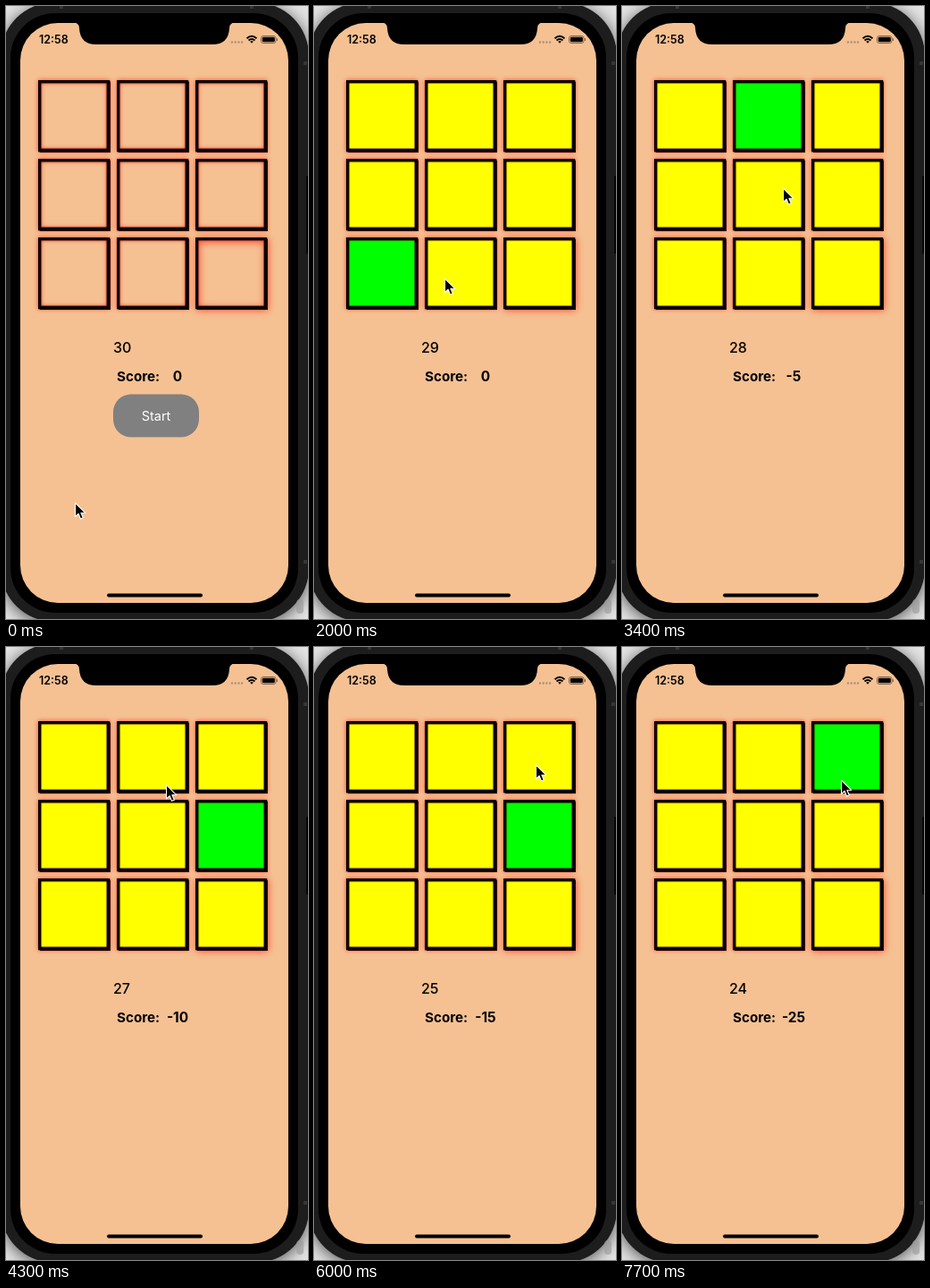
An HTML page that plays this animation: 338 px wide and 686 px high, repeating every 8000 ms.

```html
<!DOCTYPE html>
<html lang="en">
<head>
<meta charset="utf-8">
<title>Tap the square</title>
<style>
  html, body { margin: 0; width: 100%; height: 100%; overflow: hidden; background: #e4e4e4; }
  #stage { position: absolute; left: 0; top: 0; width: 338px; height: 686px; overflow: hidden; }
  svg { position: absolute; left: 0; top: 0; overflow: visible; }
  text { font-family: Inter, Roboto, sans-serif; }
  #body {
    position: absolute; left: -6px; top: -4px; width: 345px; height: 693px;
    border-radius: 60px; background: #1d1d1e; box-shadow: 0 3px 18px rgba(0, 0, 0, .65);
  }
  .cell {
    --edge: 0 0 1px .5px #300;
    --glow: rgba(255, 45, 25, .85);
    position: absolute; box-sizing: border-box; width: 80px; height: 80px;
    border: 3px solid #080000;
    box-shadow: var(--edge), inset var(--edge), 0 0 5px var(--glow), inset 0 0 5px var(--glow);
  }
  .cell:nth-child(9) {
    box-shadow: var(--edge), inset var(--edge), 1px 1px 8px var(--glow), inset 1px 2px 8px var(--glow);
  }
  .on .cell { background: #ff0; box-shadow: var(--edge), inset var(--edge), 0 0 5px var(--glow); }
  .on .cell:nth-child(9) { box-shadow: var(--edge), inset var(--edge), 1px 1px 8px var(--glow); }
  .on .cell.lit { background: #0f0; }
</style>
</head>
<body>
<div id="stage">
  <div id="body"></div>
  <svg width="338" height="686" viewBox="0 0 338 686">
    <!-- phone -->
    <rect x="5" y="8" width="322" height="671" rx="50" fill="#000"/>
    <path d="M62 0v3M275 0v3M333 64h4M333 622h4" stroke="#363636" stroke-width="4"/>
    <rect x="336" y="190" width="2" height="87" fill="#050505"/>
    <rect x="325" y="664" width="8" height="16" rx="4" fill="#999" opacity=".6"/>
    <rect x="16" y="19" width="300" height="649" rx="42" fill="#f5c193"/>
    <path d="M76 18.500Q82 19 82 25Q83 43 101 43H231Q249 43 250 25Q250 19 256 18.500Z" fill="#000"/>
    <!-- status bar -->
    <text x="37" y="42" font-size="12.500" font-weight="600">12:58</text>
    <path d="M253 40.500h12" stroke="#a98e76" stroke-width="2.400" stroke-linecap="round" stroke-dasharray="0 3.700"/>
    <path d="M269.500 36.200Q275 31.400 280.500 36.200M271.500 38.500Q275 35.400 278.500 38.500"
      fill="none" stroke="#000" stroke-width="1.900"/>
    <path d="M273.200 39.800Q275 38.400 276.800 39.800L275 41.800Z"/>
    <rect x="285.500" y="33.500" width="16.500" height="8" rx="2.300" fill="none" stroke="#806650"/>
    <rect x="286.800" y="34.800" width="14" height="5.400" rx="1.200"/>
    <rect x="302.800" y="36" width="1.200" height="3" rx=".6" fill="#806650"/>
    <!-- labels -->
    <text id="clock" x="120" y="388" font-size="16" font-weight="500"></text>
    <text x="124" y="420" font-size="15.200" font-weight="700">Score:</text>
    <text id="score" x="192" y="420" font-size="15.400" font-weight="700" text-anchor="middle"></text>
    <g id="start">
      <rect x="120" y="434.500" width="96" height="48" rx="20" fill="#808080"/>
      <text x="168" y="464" font-size="14.500" fill="#fff" text-anchor="middle">Start</text>
    </g>
    <rect x="113" y="657.500" width="107" height="4" rx="2"/>
  </svg>
  <div id="grid"></div>
  <svg width="338" height="686" viewBox="0 0 338 686">
    <path id="cursor" d="M0 0V15.500L3.600 12.200L6 18L8.800 16.800L6.400 11.200H11.200Z"
      fill="#000" stroke="#fff" stroke-width="1.100" stroke-linejoin="round"/>
  </svg>
</div>
<script>
  const LOOP = 8000, STEP = 100;
  const GAME_START = 1900, SECOND = 1020;
  const targets = '615252';                       // lit cell for each game second
  const taps = [3000, 4200, 5200, 7200, 7600];    // every tap costs five points
  const home = [77.5, 556];
  // pointer glides: from, to, x, y
  const glides = [
    [0, 900, 166.5, 466], [1800, 2000, 146.5, 305], [2000, 2700, 88, 300],
    [2700, 3000, 180.5, 204], [3700, 4000, 172, 145], [4100, 5000, 231.5, 219],
    [5100, 5800, 248.5, 132], [6200, 6800, 248, 208], [7300, 7700, 245.5, 149]
  ];

  const $ = id => document.getElementById(id);
  const clamp = p => Math.min(1, Math.max(0, p));
  const ease = p => p * p * (3 - 2 * p);

  function pointer(t) {
    return glides.reduce(([x, y], [from, to, x1, y1]) => {
      const p = ease(clamp((t - from) / (to - from)));
      return [x + (x1 - x) * p, y + (y1 - y) * p];
    }, home);
  }

  const cells = Array.from({ length: 9 }, (_, i) => {
    const cell = document.createElement('div');
    cell.className = 'cell';
    cell.style.left = 36 + i % 3 * 88 + 'px';
    cell.style.top = 83 + Math.floor(i / 3) * 88 + 'px';
    return $('grid').appendChild(cell);
  });

  function draw(now) {
    const t = Math.floor(now % LOOP / STEP) * STEP;
    const playing = t >= GAME_START;
    const second = Math.floor((t - GAME_START) / SECOND);
    $('clock').textContent = playing ? 29 - second : 30;
    $('score').textContent = 0 - 5 * taps.filter(tap => tap <= t).length;
    $('start').style.display = t < 1100 ? '' : 'none';
    $('grid').className = playing ? 'on' : '';
    cells.forEach((cell, i) => cell.classList.toggle('lit', playing && i === +targets[second]));
    $('cursor').setAttribute('transform', `translate(${pointer(t)})`);
  }

  const begin = performance.now();
  function tick() {
    draw(performance.now() - begin);
    requestAnimationFrame(tick);
  }
  tick();
</script>
</body>
</html>
```
